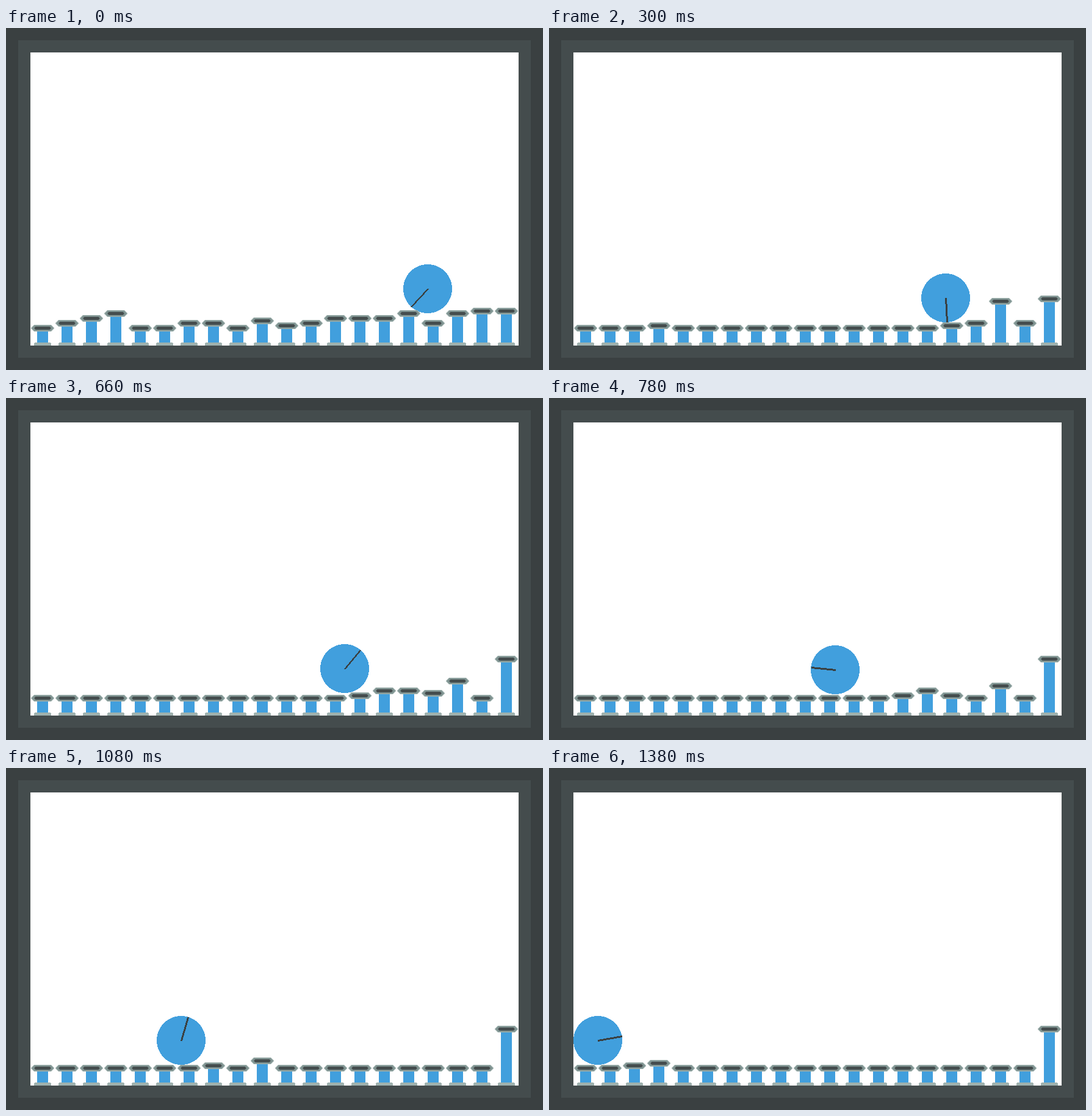
These frames come from a looping animation (880 px wide and 560 px high, 1.44 s). An HTML page with a canvas:

```html
<!DOCTYPE html>
<html lang="en">
<head>
<meta charset="utf-8">
<title>Pistons and ball</title>
<style>
html, body { margin: 0; width: 100%; height: 100%; overflow: hidden; background: #3a4041; }
canvas { display: block; }
</style>
</head>
<body>
<canvas id="stage" width="880" height="560"></canvas>
<script>
const ctx = document.getElementById('stage').getContext('2d');
const STEP = 60, STEPS = 24, RADIUS = 40, MAX_HEIGHT = 16, PASS = 15;
const BLUE = '#419fdd', DARK = '#3a4041', FRAME = '#444c4d', GREY = '#809492', LIGHT = '#9fb1ae';

// Heights are counted in units of 4 px; a piston moves one unit per step.
const startHeights = [0, 2, 4, 6, 0, 0, 2, 2, 0, 3, 1, 2, 4, 4, 4, 6, 2, 6, 7, 7];

// How high some pistons rise behind the ball; the others stay down.
const lifts = { 2: 2, 3: 2, 7: 2, 9: 3, 10: 2, 13: 2, 14: 4, 15: 4, 16: 5, 17: 12, 19: Infinity };

// Ball path: step, x, y
const path = [[0, 691, 427], [3, 683, 437], [7, 616, 446], [10, 565, 446],
  [11, 555, 443], [15, 383, 446], [18, 287, 446], [23, 80, 446]];

function ballAt(step) {
  const i = Math.max(1, path.findIndex(key => key[0] >= step));
  const [s0, x0, y0] = path[i - 1], [s1, x1, y1] = path[i];
  const k = (step - s0) / (s1 - s0);
  return [x0 + (x1 - x0) * k, y0 + (y1 - y0) * k];
}

const pistons = startHeights.map((start, i) => {
  const x = 60 + 40 * i;
  let passed = 0; // step at which the ball has rolled past
  while (passed < STEPS - 1 && ballAt(passed)[0] > x - PASS) passed++;
  const low = Math.max(0, start - passed);
  return { x, start, passed, low, lift: Math.max(low, lifts[i] || 0) };
});

// Sink until the ball has passed, then rise to the lift and sink again.
function pistonY({ start, passed, low, lift }, step) {
  const t = step - passed;
  const height = t < 0 ? start - step : Math.min(MAX_HEIGHT, low + t, 2 * lift - low - t);
  return 491 - 4 * Math.max(0, height);
}

function rect(color, x, y, w, h) {
  ctx.fillStyle = color;
  ctx.fillRect(x, y, w, h);
}

function plate(color, x, y, halfW, halfH, cut) {
  const side = Math.max(0, halfH - cut);
  ctx.fillStyle = color;
  ctx.beginPath();
  for (const [sx, sy] of [[1, 1], [-1, 1], [-1, -1], [1, -1]]) {
    const corner = [[x + sx * halfW, y + sy * side], [x + sx * (halfW - cut), y + sy * halfH]];
    if (sx !== sy) corner.reverse();
    corner.forEach(p => ctx.lineTo(...p));
  }
  ctx.fill();
}

function drawBody(x, y) {
  rect(BLUE, x - 9, y + 5, 18, 510 - y);
  rect(LIGHT, x - 13, 515, 26, 1);
  rect(LIGHT, x - 14, 516, 28, 4);
}

function drawHead(x, y) {
  plate(LIGHT, x, y + 0.5, 19, 5.5, 5);
  plate(GREY, x, y + 0.5, 17.5, 4.5, 4);
  plate(FRAME, x, y + 0.5, 13.5, 2.5, 2);
}

// Disc and hand are built from whole pixels to keep hard edges.
function drawBall(step) {
  const [x, y] = ballAt(step).map(Math.round);
  for (let row = -RADIUS; row < RADIUS; row++) {
    const half = Math.round(Math.sqrt(RADIUS ** 2 - (row + 0.5) ** 2));
    rect(BLUE, x - half, y + row, 2 * half, 1);
  }
  const angle = 2.325 - Math.max(0, 683 - x) / RADIUS; // rolls without slipping
  const dx = Math.trunc(RADIUS * Math.cos(angle)), dy = Math.trunc(RADIUS * Math.sin(angle));
  const flat = Math.abs(dx) > Math.abs(dy), count = Math.max(Math.abs(dx), Math.abs(dy));
  for (let i = 0; i <= count; i++) {
    const px = Math.round(x + dx * i / count), py = Math.round(y + dy * i / count);
    if (flat) rect(DARK, px, py - 1, 1, 3);
    else rect(DARK, px - 1, py, 3, 1);
  }
}

function draw(step) {
  rect(DARK, 0, 0, 880, 560);
  rect(FRAME, 20, 20, 840, 520);
  rect('#fff', 40, 40, 800, 480);
  pistons.forEach(p => drawBody(p.x, pistonY(p, step)));
  drawBall(step);
  pistons.forEach(p => drawHead(p.x, pistonY(p, step)));
}

function tick() {
  draw(Math.floor(performance.now() / STEP) % STEPS);
  requestAnimationFrame(tick);
}
tick();
</script>
</body>
</html>
```
